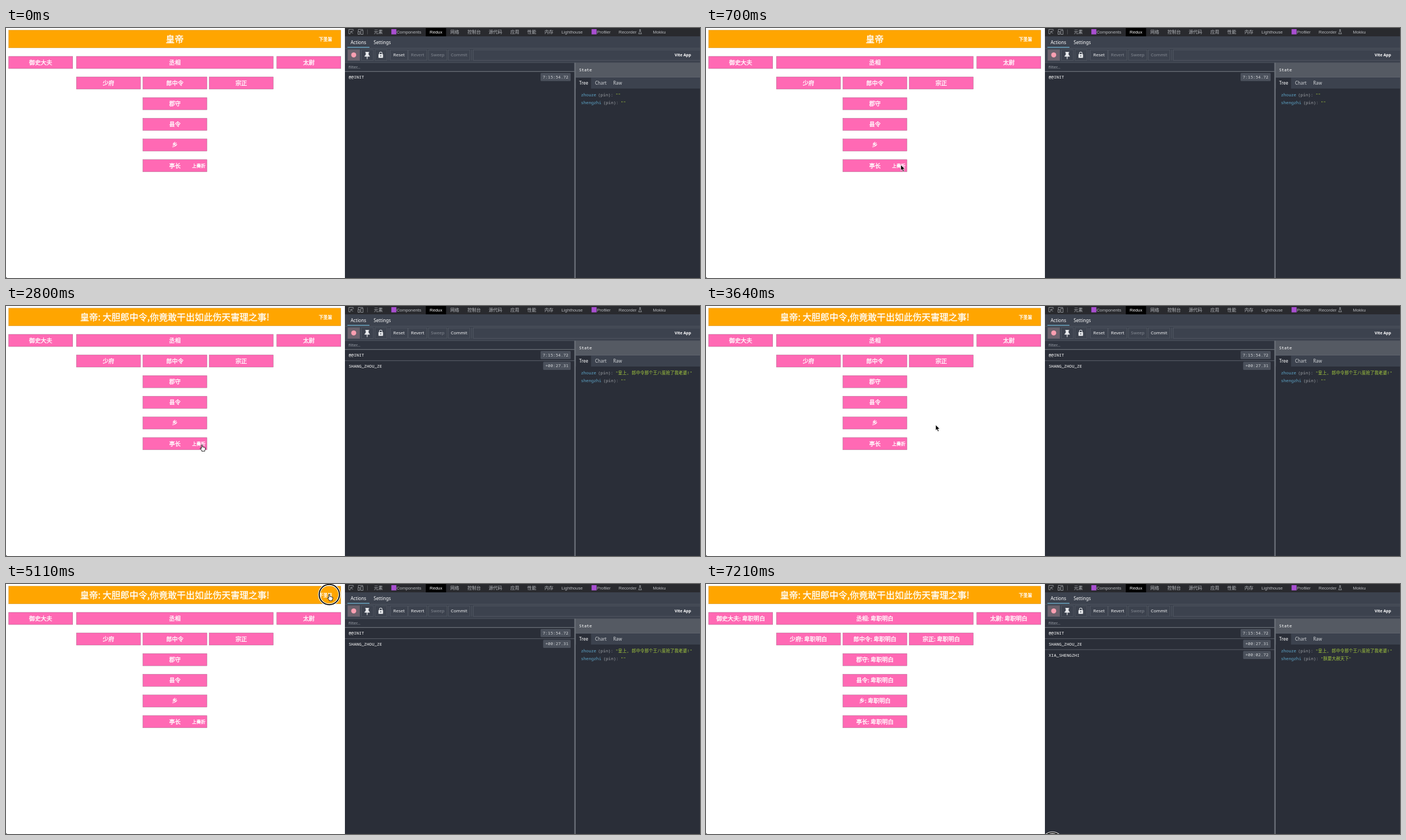
Write an HTML page that moves like this. It is 1245 px wide and 450 px high and loops after 7.28 s.

```html
<!DOCTYPE html>
<html lang="zh">
<head>
<meta charset="utf-8">
<title>Redux demo</title>
<style>
  html, body { margin: 0; width: 100%; height: 100%; overflow: hidden; background: #fff; }
  svg { display: block; }
  text { white-space: pre; }
  .cjk { font-family: 'Noto Sans CJK SC', 'Noto Sans CJK', sans-serif; }
  .bold { stroke: #fff; stroke-width: .35px; }
  .tab { font-family: 'Liberation Sans', 'Noto Sans CJK SC', sans-serif; }
  .ui { font-family: 'Noto Sans', sans-serif; font-weight: 500; }
  .mono { font-family: 'Noto Sans Mono', 'Noto Sans CJK SC', monospace; }
</style>
</head>
<body>
<svg id="stage" width="1245" height="450" viewBox="0 0 1245 450"></svg>
<script>
const LOOP = 7280, STEP = 70;
const PINK = '#ff69b4', BASE = '#2a2e38', BAR = '#3c424e', LINE = '#575d68';

const rect = (x, y, w, h, fill, extra = '') =>
  `<rect x="${x}" y="${y}" width="${w}" height="${h}" fill="${fill}" ${extra}/>`;
// y is the vertical middle of the line
const text = (s, x, y, size, cls, fill = '#fff', anchor = 'start') =>
  `<text x="${x}" y="${y + size * .36}" font-size="${size}" class="${cls}" fill="${fill}" text-anchor="${anchor}">${s}</text>`;
// shown only in the listed states: 0 start, 1 report sent, 2 decree sent
const when = (states, body) => `<g data-in="${states}">${body}</g>`;

function court() {
  const edge = 'stroke="#7d4a66" stroke-opacity=".6" stroke-width=".6"';
  const label = (s, x, y, size = 10.3) => text(s, x, y, size, 'cjk bold', '#fff', 'middle');
  const posts = [
    ['御史大夫', 4.7, 51, 115], ['丞相', 126.3, 51, 353.2], ['太尉', 485.7, 51, 115],
    ['少府', 126.3, 88, 115], ['郎中令', 245.5, 88, 115], ['宗正', 364.5, 88, 115],
    ['郡守', 245.5, 125.2, 115], ['县令', 245.5, 162.4, 115],
    ['乡', 245.5, 199.6, 115], ['亭长', 245.5, 236.8, 115]
  ];
  return rect(0, 0, 608, 450, '#fff') + '<path d="M0 448v2h2Z" fill="#555"/>' +
    rect(4.7, 3.8, 596, 32, '#ffa500', 'stroke="#8a6a2a" stroke-opacity=".5" stroke-width=".5"') +
    when('0', label('皇帝', 302.7, 20, 16.1)) +
    when('12', label('皇帝: 大胆郎中令,你竟敢干出如此伤天害理之事!', 302.7, 20, 16.1)) +
    label('下圣旨', 573.3, 19.8, 8) +
    posts.map(([name, x, y, w]) => rect(x, y, w, 22, PINK, edge) +
      when('01', label(name, x + w / 2, y + 11)) +
      when('2', label(name + ': 卑职明白', x + w / 2, y + 11))).join('') +
    when('01', label('上奏折', 345.7, 248, 8));
}

function tabs() {
  const names = [
    ['元素', 660], ['Components', 700.7], ['Redux', 760], ['网络', 797], ['控制台', 827.7],
    ['源代码', 866], ['应用', 904.7], ['性能', 935.3], ['内存', 966], ['Lighthouse', 996.5],
    ['Profiler', 1060], ['Recorder', 1099], ['Mokku', 1160.5]
  ];
  return rect(608, 0, 637, 15, '#292a2e') + rect(753, 0, 36.5, 15, '#000') +
    `<g fill="none" stroke="#9a9da2" stroke-width=".9">
      <path d="M618 10.5h-3v-8h8v3M618.500 6l4 4M618.500 9.500v-3.500h3.500"/>
      <path d="M632 6V2.500h8V4M631.500 6.500h3v5h-3ZM636.500 4.500h4v7h-4Z"/>
      <path d="M648.500 2.500v9" stroke="#55585e"/>
      <path d="M1136 3h3M1136.800 3v3l-2 4.500h5.400l-2-4.500v-3"/>
    </g>` +
    rect(691.3, 2, 9, 9.5, '#a84fd0') + rect(1050.5, 2, 9, 9.5, '#a84fd0') +
    names.map(([s, x]) => text(s, x, 6.8, /[a-z]/.test(s) ? 7.8 : 8, 'tab',
      s === 'Redux' ? '#fff' : '#b9bcc0')).join('');
}

function toolbar() {
  const button = (s, x, w, on) => {
    const face = color => text(s, x + w / 2, 48.3, 7.95, 'ui', color, 'middle');
    const live = on && when(on, face('#f4f5f6'));
    const off = [...'012'].filter(c => !on.includes(c)).join('');
    return rect(x, 39.5, w, 18.5, 'none', `stroke="${LINE}" stroke-width=".7"`) +
      (live || '') + (off ? when(off, face('#858a93')) : '');
  };
  const box = x => rect(x, 39, 21.5, 19.5, 'none', `stroke="${LINE}" stroke-width=".7"`);
  return rect(608, 15, 637, 47.5, BAR) +
    text('Actions', 618.2, 26, 8.1, 'ui') + text('Settings', 659.5, 26, 8.1, 'ui') +
    rect(608, 36, 637, .8, '#545a65') + rect(612.5, 34, 39.5, 1.3, '#6fb3d2') +
    rect(613, 38.5, 22, 20.5, '#6c626d') + box(613) + box(637.5) + box(662) +
    '<circle cx="623.800" cy="48.500" r="4.500" fill="#fb9fb1"/>' +
    '<path d="M644.500 43h7v1.300h-1v4l2 2v1.300h-4v4l-.6 1-.6-1v-4h-4v-1.300l2-2v-4h-.8Z" fill="#e8eaed"/>' +
    '<path d="M670 47.500v-2a2.300 2.300 0 0 1 4.600 0v2" fill="none" stroke="#e8eaed" stroke-width="1.100"/>' +
    rect(668.2, 47, 8.2, 6.8, '#e8eaed', 'rx=".8"') +
    '<circle cx="672.300" cy="50.300" r="1" fill="#3c424e"/>' +
    rect(686.5, 39, .7, 19.5, LINE) +
    button('Reset', 689.5, 31, '012') + button('Revert', 722, 33, '12') +
    button('Sweep', 758, 33, '') + button('Commit', 793.5, 38.5, '12') +
    rect(835, 39, .7, 19.5, LINE) +
    rect(838.3, 39.2, 410, 19, 'none', `stroke="${LINE}" stroke-width=".8"`) +
    `<g style="font-weight:600">${text('Vite App', 1214.3, 48.6, 7, 'ui', '#fff', 'middle').replace('class="ui"', 'class="ui" style="font-weight:600"')}</g>`;
}

function log() {
  const row = (name, time, y, line) => {
    const w = time.length * 4.6 + 8;
    return (line ? rect(608, y - 10.3, 412, .8, '#6a6f79') : '') +
      text(name, 614.7, y, 7.7, 'mono') +
      rect(1013 - w, y - 7.6, w, 14.5, '#4b515c', 'rx="1.500"') +
      text(time, 1009, y - .5, 7.7, 'mono', '#d0d3d6', 'end');
  };
  return rect(608, 62.5, 637, 387.5, BASE) + rect(608, 62.5, 412, 15.5, '#2f343f') +
    rect(608, 62, 637, .8, '#4a505b') +
    text('filter...', 614.5, 70, 7.5, 'ui', '#9a9fa7') +
    rect(608, 77.8, 412, .9, '#858a92') +
    row('@@INIT', '7:15:54.72', 88.5) +
    when('12', row('SHANG_ZHOU_ZE', '+00:27.31', 108.2, true)) +
    when('2', row('XIA_SHENGZHI', '+00:02.72', 128, true));
}

function inspector() {
  const value = (s, x, y) => text(`"${s}"`, x, y, 7.65, 'mono', '#a5cb3e');
  const key = (s, x, y) => text(s, 1031.5, y, 7.6, 'mono', '#5fa8cc') +
    text('(pin):', x, y, 7.6, 'mono', '#9fa3a8');
  return rect(1019.5, 62.5, 2.5, 387.5, '#686d76') +
    rect(1022, 63, 223, 25, '#555a63') + text('State', 1028, 75, 7.7, 'mono') +
    rect(1022, 88, 223, 21, BAR) + rect(1022, 88, 223, .8, '#666b74') +
    rect(1022.5, 89.5, 27, 19.5, BASE) +
    text('Tree', 1028.2, 99, 8, 'ui') + text('Chart', 1056.7, 99, 8, 'ui', '#d3d6d9') +
    text('Raw', 1089.3, 99, 8, 'ui', '#d3d6d9') +
    key('zhouze', 1062, 120.5) + key('shengzhi', 1071.5, 133.8) +
    when('0', value('', 1093.5, 120.5)) +
    when('12', value('皇上, 郎中令那个王八蛋抢了我老婆!', 1093.5, 120.5)) +
    when('01', value('', 1102.7, 133.8)) +
    when('2', value('朕要大赦天下', 1102.7, 133.8));
}

const pointer = `
  <g id="ring" fill="none"><circle r="18.200" stroke="#fff" stroke-width="4.200"/><circle r="18.200" stroke="#111" stroke-width="2"/></g>
  <path id="arrow" d="M0 0v10l2.300-2.100 1.700 4 1.800-.8-1.700-3.800h3.200Z" fill="#000" stroke="#fff" stroke-width=".7"/>
  <path id="hand" d="M-1 .7Q0-.3 1 .7V4.500l1-.3 1 .6 1-.2 1 .8 1.200.3V8.500L5.200 10v1.800H-.4V10.500L-3 7.500Q-3.600 6-2.300 6L-1 7.200Z" fill="#fff" stroke="#000" stroke-width=".9"/>`;

const stage = document.getElementById('stage');
stage.innerHTML = court() + tabs() + toolbar() + log() + inspector() + pointer;
const [ring, arrow, hand] = ['ring', 'arrow', 'hand'].map(id => document.getElementById(id));
const gated = [...stage.querySelectorAll('[data-in]')];

// time, x, y, cursor shape from then on
const path = [
  [70, 612, 438, 'arrow'], [350, 430, 300, 'arrow'], [560, 362, 254, 'arrow'],
  [700, 349.5, 246.5, 'arrow'], [1050, 349.5, 246.5, 'arrow'],
  [1190, 353, 247, 'arrow'], [1260, 353, 247, 'arrow'], [1330, 359, 240, 'arrow'],
  [1400, 356, 236, 'arrow'], [1540, 351.5, 249.5, 'hand'], [3220, 351.5, 249.5, 'hand'],
  [3290, 363, 240, 'arrow'], [3500, 407, 211, 'arrow'], [3570, 407, 211, 'arrow'],
  [3640, 412, 214, 'arrow'], [3920, 520, 100, 'arrow'], [4200, 599, 12.500, 'arrow'],
  [4340, 599, 12.500, 'arrow'], [4620, 580, 18.300, 'hand'], [6020, 580, 18.300, 'hand'],
  [6090, 583, 42, 'arrow'], [6160, 592, 190, 'arrow'], [6230, 605, 409, 'arrow'], [6300, 605, 460, '']
];
// time, x, y, opacity
const rings = [
  [0, 0, 0, 0], [2170, 351, 249.5, 1], [2310, 351, 249.5, .6], [2380, 351, 249.5, .25], [2450, 0, 0, 0],
  [5110, 580, 19, 1], [5180, 580, 19, .5], [5250, 0, 0, 0], [7210, 621.5, 466, 1]
];
const last = (list, t) => list.findLastIndex(k => k[0] <= t);

function place(el, x, y, opacity) {
  el.setAttribute('transform', `translate(${x} ${y})`);
  el.setAttribute('opacity', opacity);
}

function draw(now) {
  const t = Math.floor(now % LOOP / STEP) * STEP;
  const state = t < 2380 ? '0' : t < 5180 ? '1' : '2';
  for (const g of gated) g.style.display = g.dataset.in.includes(state) ? '' : 'none';

  const i = last(path, t), a = path[i] || [0, 0, 0, ''], b = path[i + 1];
  const k = i >= 0 && b ? (t - a[0]) / (b[0] - a[0]) : 0;
  const x = a[1] + (b ? (b[1] - a[1]) * k : 0);
  const y = a[2] + (b ? (b[2] - a[2]) * k : 0);
  place(arrow, x, y, +(a[3] === 'arrow'));
  place(hand, x, y, +(a[3] === 'hand'));
  place(ring, ...rings[last(rings, t)].slice(1));
}

const start = performance.now();
(function tick() {
  draw(performance.now() - start);
  requestAnimationFrame(tick);
})();
</script>
</body>
</html>
```
